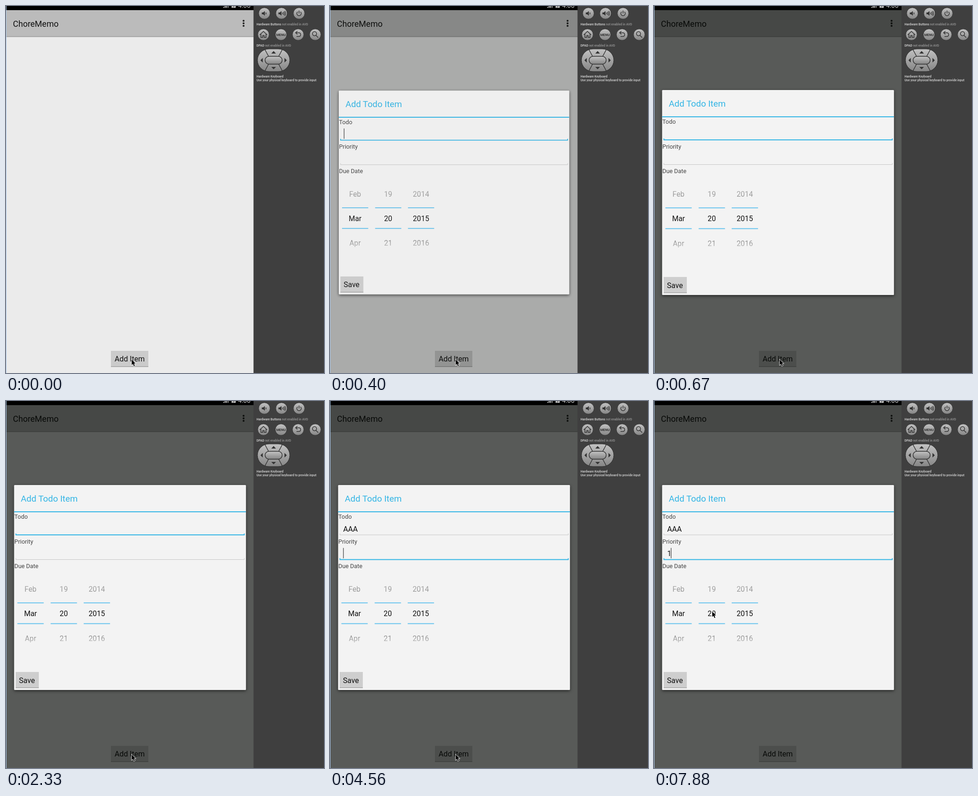
Write an HTML page that moves like this. It is 688x795 px and loops after 8 s.

```html
<!DOCTYPE html>
<html lang="en">
<head>
<meta charset="utf-8">
<title>Todo dialog</title>
<style>
html, body { margin: 0; width: 100%; height: 100%; overflow: hidden; background: #3f3f3f; }
svg { display: block; width: 688px; height: 795px; }
text { font-family: Roboto, "Noto Sans", sans-serif; font-size: 16.2px; fill: #111; white-space: pre; }
.bar-title { font-size: 18px; }
.dialog-title { font-size: 18.9px; fill: #33b5e5; }
.label { font-size: 12.9px; fill: #444; }
.date text { text-anchor: middle; font-size: 15.8px; }
.side text { font-size: 6.62px; font-weight: 700; fill: #c4c4c4; }
.side .off { fill: #8c8c8c; }
.icon { fill: #333; stroke: none; }
.line { fill: none; stroke: #333; stroke-width: 1.5; }
#card { filter: drop-shadow(0 2px 3px rgba(0,0,0,.6)); }
</style>
</head>
<body>
<svg viewBox="0 0 688 795">
  <defs>
    <linearGradient id="metal" x2="0" y2="1">
      <stop stop-color="#c2c2c2"/><stop offset="1" stop-color="#858585"/>
    </linearGradient>
    <linearGradient id="fadeTop" gradientUnits="userSpaceOnUse" x1="0" y1="396" x2="0" y2="418">
      <stop stop-color="#b0b0b0"/><stop offset="1" stop-color="#8c8c8c"/>
    </linearGradient>
    <linearGradient id="fadeBottom" gradientUnits="userSpaceOnUse" x1="0" y1="505" x2="0" y2="524">
      <stop stop-color="#858585"/><stop offset="1" stop-color="#c0c0c0"/>
    </linearGradient>
  </defs>

  <!-- app screen -->
  <rect width="536" height="795" fill="#ebebeb"/>
  <rect y="9" width="536" height="58" fill="#bbb"/>
  <rect y="65.5" width="536" height="1.5" fill="#a2a2a2"/>
  <rect y="67" width="536" height="1" fill="#d8d8d8"/>
  <text class="bar-title" x="15" y="44.5">ChoreMemo</text>
  <g fill="#222">
    <circle cx="514" cy="32" r="2.1"/><circle cx="514" cy="37.5" r="2.1"/><circle cx="514" cy="43" r="2.1"/>
  </g>
  <rect x="227" y="747" width="81" height="35" fill="#cbcbcb"/>
  <rect x="227" y="780.5" width="81" height="1.5" fill="#a4a4a4"/>
  <text x="235" y="770">Add Item</text>
  <rect id="dim" y="9" width="536" height="786" fill="#000400"/>

  <!-- status bar -->
  <rect width="536" height="9" fill="#000"/>
  <g fill="#b8b8b8">
    <path d="M470 4V2h2v2zM473 4V0h2v4zM476 4V0h2v4z"/>
    <path d="M479 0h3v4h-3z" fill="#666"/>
    <path d="M488 0h9v4h-9z"/>
    <path d="M491 3l3-3" stroke="#222"/>
  </g>
  <text x="502" y="4" style="font-size:14px;fill:#c4c4c4">4:00</text>
  <rect width="1" height="795" fill="#a9c8ea"/>

  <!-- dialog -->
  <g id="dialog">
    <rect id="card" x="17.5" y="182" width="501.7" height="444" rx="1.5" fill="#f3f3f3"/>
    <text class="dialog-title" x="32" y="218">Add Todo Item</text>
    <rect x="17.5" y="239" width="501.5" height="2" fill="#33b5e5"/>
    <text class="label" x="18" y="255">Todo</text>
    <text class="label" x="18" y="308.5">Priority</text>
    <text class="label" x="18" y="362">Due Date</text>
    <path id="line0"/><path id="line1"/>
    <text id="field0" x="28.5" y="282.5"></text>
    <text id="field1" x="28.5" y="336"></text>
    <rect id="caret" width="1.3" height="22.5" fill="#444"/>
    <g class="date" id="date"></g>
    <rect x="21" y="587" width="50" height="35" fill="#cecece"/>
    <rect x="21" y="620.5" width="50" height="1.5" fill="#a8a8a8"/>
    <text x="28" y="610.5">Save</text>
  </g>

  <!-- emulator side panel -->
  <g class="side">
    <rect x="535.5" width="152.5" height="795" fill="#3f3f3f"/>
    <g id="buttons" fill="url(#metal)" stroke="#2b2b2b" stroke-width=".8"></g>
    <path class="icon" d="M553.5 14h3l3.5-3v10l-3.5-3h-3zM589.5 14h3l3.5-3v10l-3.5-3h-3z"/>
    <path class="line" stroke-width="1" d="M562 14q1.5 2 0 4M598 14q1.5 2 0 4M600.5 12.5q2.5 3.5 0 7M603 11q3.5 5 0 10"/>
    <path class="line" d="M631 12.5a4.8 4.8 0 1 0 6 0M634 10v6"/>
    <path class="line" d="M549 62.5l8-7.5 8 7.5M551.5 61v7h4v-4h3v4h4v-7"/>
    <text x="595" y="64.6" text-anchor="middle" style="font-size:7.4px;fill:#333">MENU</text>
    <path class="line" d="M627.5 58h6q4 0 4 4t-4 4h-5M630.5 54.5l-4 3.5 4 3.5"/>
    <circle class="line" cx="667.5" cy="60" r="4.4"/>
    <path class="line" stroke-width="2" d="M670.5 63.5l5 5"/>
    <text x="542" y="42.3">Hardware Buttons <tspan class="off">not enabled in AVD</tspan></text>
    <text x="542" y="87.8">DPAD <tspan class="off">not enabled in AVD</tspan></text>
    <text x="542" y="155.3">Hardware Keyboard</text>
    <text x="542" y="162.8">Use your physical keyboard to provide input</text>
    <rect x="544" y="93" width="70" height="49" rx="25" fill="url(#metal)" stroke="#2b2b2b"/>
    <path class="line" d="M560 94l8 15M598 94l-8 15M560 141l8-15M598 141l-8-15"/>
    <rect x="560.5" y="109" width="37" height="17" rx="8.5" fill="url(#metal)" stroke="#333" stroke-width="1.5"/>
    <path class="icon" d="M574 103l5-5.500 5 5.500zM574 132l5 5 5-5zM555.500 112.500v10l-5-5zM602.500 112.500v10l5-5z"/>
  </g>

  <path id="cursor" d="M0 0V11.700L2.700 9.300 4.700 14 6.700 13.200 4.700 8.600H8.200Z"
    fill="#000" stroke="#fff" stroke-width="1.5" paint-order="stroke"/>
</svg>
<script>
const LOOP = 8000;
const $ = id => document.getElementById(id);

// Each row: start time, then the values held until the next row.
const dialogSteps = [ // scale, opacity, dim
  [0, 1, 0, 0], [280, .987, .87, .2], [400, .994, .95, .28], [550, .998, 1, .36], [670, 1, 1, .625]
];
const inputSteps = [ // focused field, todo, priority
  [0, 0, '', ''], [2980, 0, 'A', ''], [3410, 0, 'AA', ''], [3720, 0, 'AAA', ''],
  [4560, 1, 'AAA', ''], [5700, 1, 'AAA', '1']
];
const caretSteps = [
  [0, 1], [670, 0], [920, 1], [1370, 0], [1780, 1], [2330, 0], [2860, 1], [4250, 0],
  [4560, 1], [4990, 0], [5450, 1], [6260, 0], [6570, 1], [7090, 0], [7600, 1]
];
const cursorSteps = [ // x, y of the tip
  [0, 272, 766], [6570, 271, 665], [6690, 270, 566], [6940, 143, 548], [7090, 140, 538],
  [7210, 136, 526], [7340, 132, 514], [7460, 129, 504], [7720, 128, 504], [7880, 126, 456]
];
const at = (steps, t) => steps.findLast(row => row[0] <= t).slice(1);

function add(parent, tag, attrs, text = '') {
  const node = document.createElementNS('http://www.w3.org/2000/svg', tag);
  for (const key in attrs) node.setAttribute(key, attrs[key]);
  node.textContent = text;
  parent.append(node);
}

[[53, 'Feb', 'Mar', 'Apr'], [125, '19', '20', '21'], [196.5, '2014', '2015', '2016']]
  .forEach(([x, before, now, after]) => {
    add($('date'), 'text', { x, y: 413, style: 'fill:url(#fadeTop)' }, before);
    add($('date'), 'text', { x, y: 466.3 }, now);
    add($('date'), 'text', { x, y: 519.5, style: 'fill:url(#fadeBottom)' }, after);
    for (const y of [436.3, 481.3])
      add($('date'), 'rect', { x: x - 28.4, y, width: 57, height: 2, fill: '#6cc5ee' });
  });

for (const [cx, cy] of [[559, 16], [596, 16], [634, 16], [557, 62], [595, 62], [632, 62], [669, 62]])
  add($('buttons'), 'circle', { cx, cy, r: 12.3 });

function drawUnderline(index, focused) {
  const line = $('line' + index), y = 290 + index * 53.5;
  line.setAttribute('d', `M21.5 ${y - 3}V${y}H515.5V${y - 3}`);
  line.setAttribute('style', `fill:none;stroke:${focused ? '#33b5e5' : '#c6c6c6'};stroke-width:${focused ? 1.8 : 1}`);
}

function render(t) {
  const [scale, opacity, dim] = at(dialogSteps, t);
  $('dialog').setAttribute('transform', `translate(268.5 404) scale(${scale}) translate(-268.5 -404)`);
  $('dialog').setAttribute('opacity', opacity);
  $('dim').setAttribute('opacity', dim);

  const [focus, ...values] = at(inputSteps, t);
  values.forEach((value, i) => {
    $('field' + i).textContent = value;
    drawUnderline(i, i === focus);
  });
  const advance = focus ? 8 : 10.4;
  $('caret').setAttribute('x', 28.4 + values[focus].length * advance);
  $('caret').setAttribute('y', focus ? 318.3 : 264.5);
  $('caret').setAttribute('opacity', at(caretSteps, t)[0]);

  $('cursor').setAttribute('transform', `translate(${at(cursorSteps, t).join(' ')})`);
}

const start = performance.now();
function tick(now) {
  render(Math.max(0, now - start) % LOOP);
  requestAnimationFrame(tick);
}
render(0);
requestAnimationFrame(tick);
</script>
</body>
</html>
```
